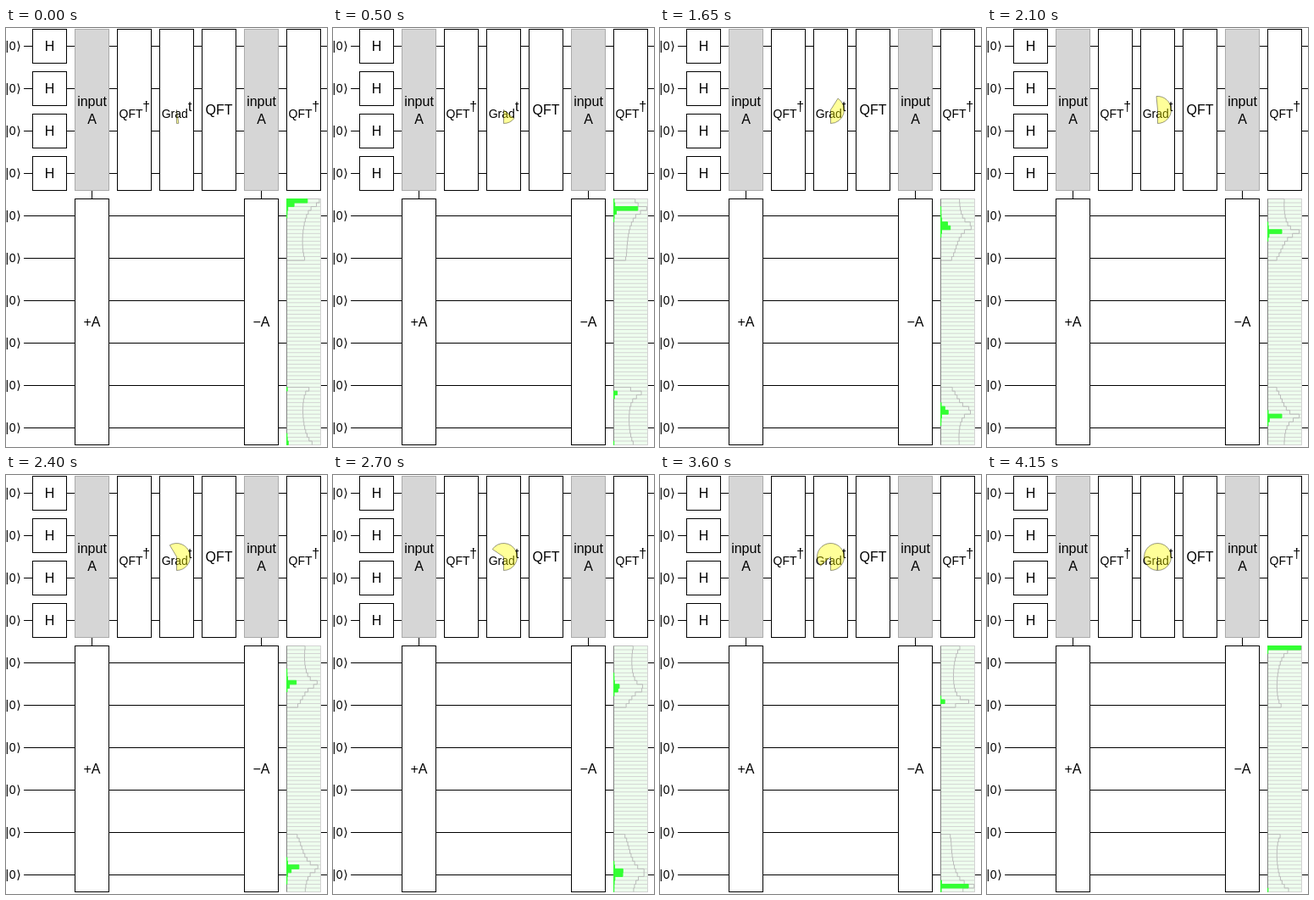
Write an HTML page that moves like this. It is 379x494 px and loops after 4.2 s.

```html
<!DOCTYPE html>
<html lang="en">
<head>
<meta charset="utf-8">
<title>Shifted register circuit</title>
<style>
  html, body { margin: 0; width: 100%; height: 100%; overflow: hidden; background: #fff; }
  svg { display: block; font-family: "Liberation Sans", Arial, sans-serif; }
</style>
</head>
<body>
<svg id="stage" width="379" height="494" viewBox="0 0 379 494"></svg>
<script>
const LOOP = 4200, STEP = 50;
const STEPS_PER_TURN = 85.5, FIRST_STEP = 2.03;
const PITCH = 50, GATE = 40;
const TOP_STATES = 16, ROWS = 64;
const CHART = { x: 331.5, y: 201.5, w: 40, h: 290 };
const ROW_H = CHART.h / ROWS;
const PIE = { x: 201.5, y: 96.5, r: 16 };

const stage = document.getElementById("stage");

function add(tag, attrs, text) {
  const node = document.createElementNS("http://www.w3.org/2000/svg", tag);
  for (const key in attrs) node.setAttribute(key, attrs[key]);
  if (text) node.textContent = text;
  stage.appendChild(node);
  return node;
}

const path = (d, stroke, fill = "none") => add("path", { d, stroke, fill });
const label = (text, x, y, size = 16, anchor = "middle") =>
  add("text", { x, y, "font-size": size, "text-anchor": anchor }, text);
const columnX = col => 31.5 + PITCH * col;
const rowY = row => 1.5 + PITCH * row;

function gate(col, row, span, fill = "#fff", stroke = "#000") {
  add("rect", {
    x: columnX(col), y: rowY(row), width: GATE,
    height: PITCH * (span - 1) + GATE, fill, stroke
  });
}

function powerLabel(base, x, power, powerX) {
  label(base, x, 106, 14, "start");
  label(power, powerX, 98, 16, "start");
}

function drawCircuit() {
  for (let row = 0; row < 10; row++) {
    const y = rowY(row) + GATE / 2;
    path(`M21 ${y}H379`, "#000");
    label("|0⟩", -.4, y + 4.5, 14, "start").setAttribute("letter-spacing", .6);
  }
  for (let row = 0; row < 4; row++) {
    gate(0, row, 1);
    label("H", 51.5, rowY(row) + 25.5);
  }
  for (const [col, text] of [[1, "+A"], [5, "−A"]]) {
    const x = columnX(col) + GATE / 2;
    path(`M${x} 191V202`, "#000");
    gate(col, 0, 4, "#d6d6d6", "#aaa");
    label("input", x, 92);
    label("A", x, 113);
    gate(col, 4, 6);
    label(text, x, 352);
  }
  for (const col of [2, 3, 4, 6]) gate(col, 0, 4);
  powerLabel("QFT", 133.5, "†", 161.2);
  powerLabel("Grad", 183.7, "t", 214.9);
  powerLabel("QFT", 333.5, "†", 361.2);
  label("QFT", 251.5, 102);
}

function drawChartBase() {
  const { x, y, w, h } = CHART;
  add("rect", { x, y, width: w, height: h, fill: "#efe", stroke: "#d3d3d3" });
  let grid = "";
  for (let i = 1; i < ROWS; i++) grid += `M${x} ${y + i * ROW_H}h${w}`;
  path(grid, "#d3d3d3");
}

drawCircuit();
drawChartBase();
const logLine = path("", "#bbb");
path(`M${CHART.x} ${CHART.y}v${CHART.h}`, "#808080");
const bars = path("", "#3f3", "#3f3");
const pie = add("path", {
  fill: "#ff0", "fill-opacity": .4, stroke: "#000", "stroke-opacity": .4
});

// Chance that the two register readings differ by the signed amount of this row.
function chance(row, shift) {
  const diff = row < ROWS / 2 ? row : row - ROWS;
  if (Math.abs(diff) >= TOP_STATES) return 0;
  const angle = Math.PI * (shift - diff);
  const kernel = Math.sin(angle) / (TOP_STATES * Math.sin(angle / TOP_STATES) || 1e-9);
  return kernel * kernel * (TOP_STATES - Math.abs(diff)) / TOP_STATES;
}

function render(time) {
  const step = Math.floor((time % LOOP) / STEP);
  const turn = (step + FIRST_STEP) / STEPS_PER_TURN;
  let outline = `M${CHART.x} ${CHART.y}`, fill = "";
  for (let row = 0; row < ROWS; row++) {
    const p = chance(row, turn * TOP_STATES);
    const y = CHART.y + row * ROW_H;
    const logX = CHART.x + CHART.w * Math.max(0, 1 + Math.log(p) / 12.3);
    outline += `L${logX} ${y}V${y + ROW_H}`;
    const width = p * CHART.w;
    if (width > .2) fill += `M${CHART.x} ${y}h${width}v${ROW_H}h${-width}z`;
  }
  logLine.setAttribute("d", outline);
  bars.setAttribute("d", fill);

  const angle = 2 * Math.PI * turn;
  const { x, y, r } = PIE;
  pie.setAttribute("d", `M${x} ${y}V${y + r}A${r} ${r} 0 ${turn > .5 ? 1 : 0} 0 ` +
    `${x + r * Math.sin(angle)} ${y + r * Math.cos(angle)}Z`);
}

const start = performance.now();
function tick() {
  render(performance.now() - start);
  requestAnimationFrame(tick);
}
tick();
</script>
</body>
</html>
```
